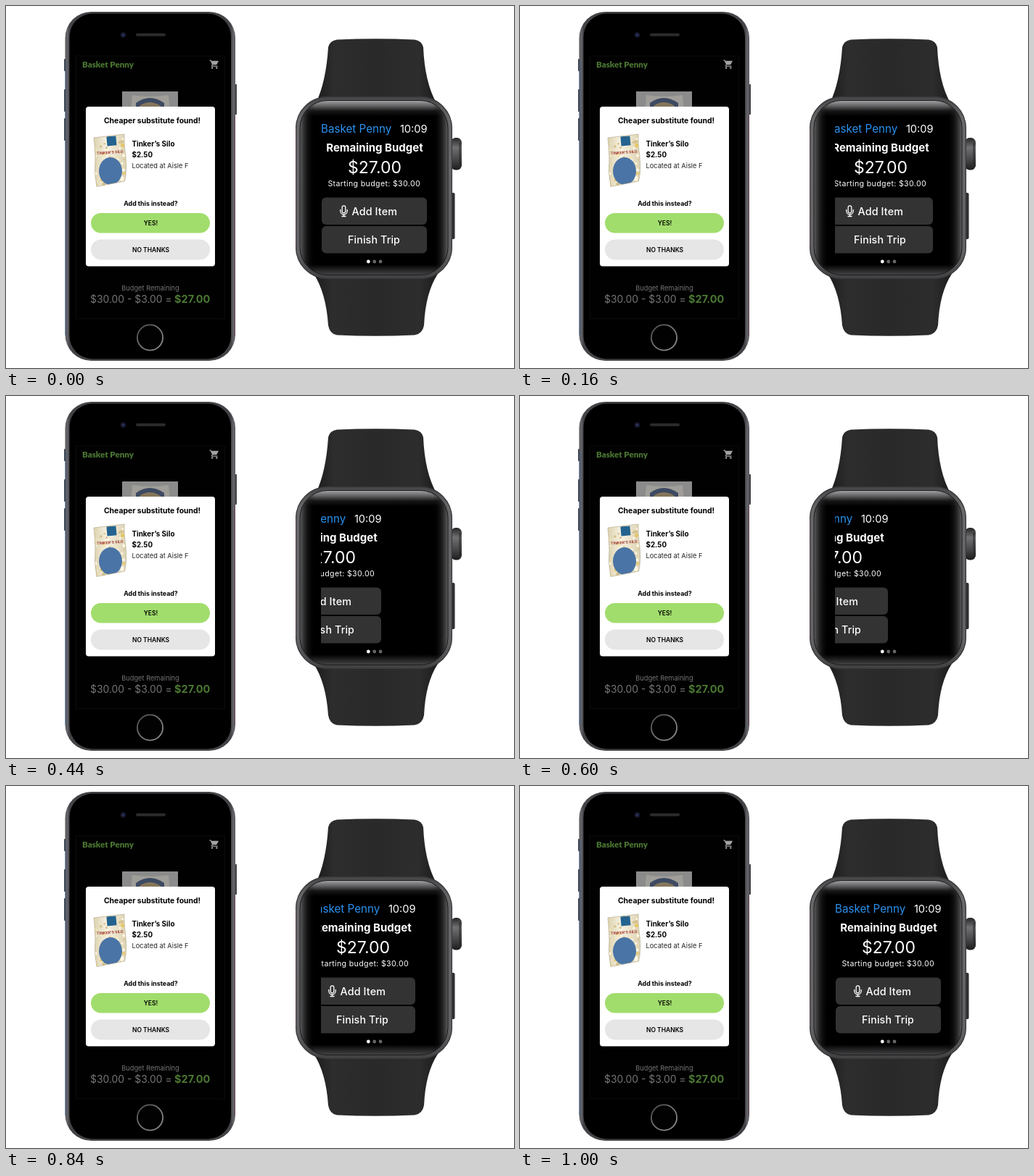
Write an HTML page that moves like this. It is 700 px wide and 500 px high and loops after 1.42 s.

```html
<!DOCTYPE html>
<html lang="en">
<head>
<meta charset="utf-8">
<title>Shopping budget on phone and watch</title>
<style>
  html, body { margin: 0; width: 100%; height: 100%; overflow: hidden; background: #fff; }
  svg { display: block; }
  text { font-family: Inter, Roboto, sans-serif; }
  .mid { text-anchor: middle; }
  .bold { font-weight: 700; }
  .semi { font-weight: 600; }
  .medium { font-weight: 500; }
  .brand { font-family: Lato, "Open Sans", sans-serif; font-weight: 900; }
  .white { fill: #fff; }
  .dim { fill: #757575; }
  .green { fill: #4b7733; }
</style>
</head>
<body>
<svg width="700" height="500" viewBox="0 0 700 500">
  <defs>
    <linearGradient id="phoneEdge">
      <stop offset="0" stop-color="#55555b"/>
      <stop offset=".012" stop-color="#66666b"/>
      <stop offset=".025" stop-color="#434347"/>
      <stop offset=".975" stop-color="#434347"/>
      <stop offset=".988" stop-color="#66666b"/>
      <stop offset="1" stop-color="#55555b"/>
    </linearGradient>
    <linearGradient id="homeRing" x1="0" y1="0" x2="1" y2="1">
      <stop offset="0" stop-color="#48484a"/>
      <stop offset=".5" stop-color="#77777a"/>
      <stop offset="1" stop-color="#8f8f92"/>
    </linearGradient>
    <linearGradient id="strap">
      <stop offset="0" stop-color="#1c1c1d"/>
      <stop offset=".15" stop-color="#2d2d2e"/>
      <stop offset=".5" stop-color="#29292a"/>
      <stop offset=".85" stop-color="#2d2d2e"/>
      <stop offset="1" stop-color="#1c1c1d"/>
    </linearGradient>
    <linearGradient id="caseMetal" x1="0" y1="0" x2="0" y2="1">
      <stop offset="0" stop-color="#454547"/>
      <stop offset=".12" stop-color="#68686b"/>
      <stop offset=".85" stop-color="#626265"/>
      <stop offset="1" stop-color="#404042"/>
    </linearGradient>
    <linearGradient id="glass" x1="0" y1="0" x2="0" y2="1">
      <stop offset="0" stop-color="#a5a5a7"/>
      <stop offset=".035" stop-color="#58585a"/>
      <stop offset=".06" stop-color="#161616"/>
      <stop offset=".09" stop-color="#000"/>
      <stop offset=".94" stop-color="#000"/>
      <stop offset="1" stop-color="#454547"/>
    </linearGradient>
    <linearGradient id="sheen">
      <stop offset="0" stop-color="#808082" stop-opacity=".75"/>
      <stop offset=".05" stop-color="#333" stop-opacity=".4"/>
      <stop offset=".1" stop-opacity="0"/>
      <stop offset=".9" stop-opacity="0"/>
      <stop offset=".95" stop-color="#333" stop-opacity=".4"/>
      <stop offset="1" stop-color="#808082" stop-opacity=".75"/>
    </linearGradient>
    <linearGradient id="crown" x1="0" y1="0" x2="0" y2="1">
      <stop offset="0" stop-color="#242425"/>
      <stop offset=".3" stop-color="#707072"/>
      <stop offset=".65" stop-color="#4a4a4c"/>
      <stop offset="1" stop-color="#1c1c1d"/>
    </linearGradient>
    <linearGradient id="foil">
      <stop offset="0" stop-color="#ddd2ad"/>
      <stop offset=".4" stop-color="#f6f1e2"/>
      <stop offset="1" stop-color="#ddd3b3"/>
    </linearGradient>
    <path id="bagShape" d="M121 182L163 177Q162.500 190 165 208Q167 228 163.500 242L125 249.500Q121 230 123 212Q122.500 195 121 182Z"/>
    <clipPath id="bagClip"><use href="#bagShape"/></clipPath>
    <clipPath id="watchClip"><rect x="434" y="160" width="147" height="184"/></clipPath>
  </defs>

  <!-- phone -->
  <g fill="#434347">
    <rect x="80" y="73" width="4" height="17" rx="1"/>
    <rect x="80" y="115" width="4" height="31" rx="1"/>
    <rect x="80" y="155" width="4" height="31" rx="1"/>
    <rect x="314" y="108" width="4" height="42" rx="1"/>
  </g>
  <rect x="81.500" y="8" width="234.500" height="482" rx="36" fill="url(#phoneEdge)"/>
  <path d="M82.200 75V455" stroke="#2f5f92" stroke-width=".8"/>
  <path d="M315.500 152V455" stroke="#74404e" stroke-width=".7"/>
  <rect x="87.500" y="10.500" width="222.500" height="477" rx="32"/>
  <rect x="96.500" y="69" width="205" height="363" fill="#010101" stroke="#0d0d0d"/>
  <circle cx="161.500" cy="40" r="3.800" fill="#17182b"/>
  <circle cx="161.500" cy="40" r="1.700" fill="#29345d"/>
  <rect x="179" y="37.800" width="41" height="4" rx="2" fill="#2b2b2c"/>
  <circle cx="198.500" cy="458" r="17.600" fill="#020202" stroke="url(#homeRing)" stroke-width="1.800"/>

  <text class="brand green" x="105" y="85" font-size="11.600">Basket Penny</text>
  <path fill="#a2a2a2" transform="translate(279.800 73.200) scale(.62)" d="M7 18a2 2 0 1 0 0 4 2 2 0 0 0 0-4zM1 2v2h2l3.600 7.600-1.350 2.450C4.500 15.400 5.500 17 7 17h12v-2H7.420c-.2 0-.3-.2-.22-.37L8.100 13h7.450c.75 0 1.400-.4 1.750-1.030l3.580-6.490A1 1 0 0 0 20 4H5.200l-.94-2zM17 18a2 2 0 1 0 0 4 2 2 0 0 0 0-4z"/>

  <rect x="160" y="118" width="77" height="30" fill="#8b8b8b"/>
  <path d="M174 123Q199 127 224 123L226 148H172Z" fill="#a09e98"/>
  <path d="M179 148V134Q198 120 218 134V148Z" fill="#3d4a62"/>
  <path d="M184 148V138Q198 128 213 138V148Z" fill="#85765b"/>

  <rect x="110" y="139" width="178" height="220.500" rx="4" fill="#fff"/>
  <text class="mid bold" x="201.500" y="161.500" font-size="10.400">Cheaper substitute found!</text>

  <g clip-path="url(#bagClip)">
    <use href="#bagShape" fill="url(#foil)"/>
    <g id="puffs"></g>
    <rect x="139" y="180" width="13" height="13" fill="#24638f" transform="rotate(-5 145 187)"/>
    <text class="mid bold" x="143.500" y="204" font-size="5.100" fill="#a23a33" transform="rotate(-4 143.500 203)">TINKER'S SILO</text>
    <ellipse cx="144" cy="228" rx="16" ry="19" fill="#4a74a5"/>
  </g>
  <use href="#bagShape" fill="none" stroke="#a99d7b" stroke-width=".6"/>

  <text class="bold" x="173.500" y="194" font-size="9.850">Tinker’s Silo</text>
  <text class="bold" x="173.500" y="209" font-size="9.800">$2.50</text>
  <text x="173.500" y="223.500" font-size="9.250" fill="#222">Located at Aisle F</text>
  <text class="mid bold" x="199.500" y="276" font-size="8.800">Add this instead?</text>
  <rect x="117" y="286" width="164" height="27.500" rx="13.750" fill="#a1dd6c"/>
  <text class="mid semi" x="199.500" y="302.500" font-size="8.500">YES!</text>
  <rect x="117" y="322.500" width="164" height="28" rx="14" fill="#e6e6e6"/>
  <text class="mid semi" x="199.500" y="339.500" font-size="8.500">NO THANKS</text>

  <text class="mid dim" x="199" y="393" font-size="9.250">Budget Remaining</text>
  <text class="dim" x="116" y="410" font-size="13.900">$30.00 - $3.00 =</text>
  <text class="bold green" x="232" y="410" font-size="14.500">$27.00</text>

  <!-- watch -->
  <path fill="url(#strap)" d="M456 46.500Q509 44 563 46.500Q573 48 575 57Q577 105 593 134H427Q441 105 444 57Q446 48 456 46.500Z"/>
  <path fill="url(#strap)" d="M424 370H595Q578 396 576 441Q574 453 563 454.500Q509 457 456 454.500Q446 453 444 441Q441 396 424 370Z"/>
  <rect x="611" y="194" width="8" height="21" fill="#2a2a2b"/>
  <rect x="613" y="182" width="15" height="44.500" rx="6.500" fill="url(#crown)"/>
  <path d="M625.500 189V220" stroke="#222" stroke-width="3" stroke-dasharray="1 1"/>
  <rect x="611" y="258" width="7.500" height="64" rx="2" fill="#303032"/>
  <rect x="399" y="125" width="216" height="252" rx="44" fill="url(#caseMetal)"/>
  <rect x="399.600" y="125.600" width="214.800" height="250.800" rx="43.400" fill="none" stroke="#39393b" stroke-width="1.200"/>
  <path d="M399.500 170V332" stroke="#71495a" stroke-width=".6"/>
  <rect x="405" y="130.500" width="204" height="241" rx="38" fill="url(#glass)"/>
  <rect x="405" y="130.500" width="204" height="241" rx="38" fill="url(#sheen)" stroke="#1c1c1d"/>

  <g clip-path="url(#watchClip)">
    <g id="page">
      <text x="434" y="175" font-size="15.200" fill="#2b91ef">Basket Penny</text>
      <text class="white" x="580.500" y="175" font-size="14.600" text-anchor="end">10:09</text>
      <text class="mid bold white" x="508" y="201" font-size="15">Remaining Budget</text>
      <text class="mid white" x="508" y="231" font-size="23">$27.00</text>
      <text class="mid white" x="507.200" y="249" font-size="10.600" letter-spacing=".35">Starting budget: $30.00</text>
      <rect x="435" y="264.500" width="145" height="37.500" rx="6" fill="#333"/>
      <rect x="435" y="304" width="145" height="37.500" rx="6" fill="#333"/>
      <g fill="none" stroke="#fff" stroke-width="1.300" stroke-linecap="round">
        <rect x="463.200" y="275.800" width="4.600" height="10" rx="2.300"/>
        <path d="M460.800 281.500V283.300A4.700 4.700 0 0 0 470.200 283.300V281.500M465.500 288V290.500M463 290.500H468"/>
      </g>
      <text class="medium white" x="476.500" y="288.700" font-size="14.300" letter-spacing=".15">Add Item</text>
      <text class="mid medium white" x="507" y="328.200" font-size="14.200" letter-spacing=".15">Finish Trip</text>
    </g>
  </g>
  <circle cx="499.300" cy="353" r="2.400" fill="#fff"/>
  <circle cx="507.700" cy="353" r="2.400" fill="#666"/>
  <circle cx="516" cy="353" r="2.400" fill="#666"/>
</svg>
<script>
  const LOOP = 1420, STEP = 20;
  const page = document.getElementById('page');

  // time in ms, distance swiped to the left, speed in px per ms
  const swipe = [
    [0, 0, 0], [160, 11, .145], [280, 33, .195], [440, 63, .168], [550, 74.4, 0],
    [600, 73, -.085], [840, 16, -.185], [1000, 0, 0], [LOOP, 0, 0]
  ];

  function swipeAt(t) {
    const i = swipe.findIndex(k => k[0] > t);
    const [t0, a, va] = swipe[i - 1], [t1, b, vb] = swipe[i];
    const span = t1 - t0, u = (t - t0) / span, w = 1 - u;
    return w * w * ((1 + 2 * u) * a + u * span * va)
         + u * u * ((3 - 2 * u) * b - w * span * vb);
  }

  // popcorn scattered over the bag
  let seed = 7;
  const random = () => (seed = seed * 16807 % 2147483647) / 2147483647;
  const tones = ['#fff8e3', '#e5c866', '#f4e5b4', '#d6c08a'];
  let puffs = '';
  for (let i = 0; i < 60; i++) {
    const x = 121 + random() * 44, y = 180 + random() * 67, r = .8 + random() * 1.8;
    puffs += `<circle cx="${x}" cy="${y}" r="${r}" fill="${tones[i % 4]}"/>`;
  }
  document.getElementById('puffs').innerHTML = puffs;

  const start = performance.now();
  function draw() {
    const t = Math.max(0, performance.now() - start) % LOOP;
    const x = swipeAt(Math.floor(t / STEP) * STEP);
    page.setAttribute('transform', `translate(${-x} 0)`);
    requestAnimationFrame(draw);
  }
  draw();
</script>
</body>
</html>
```
